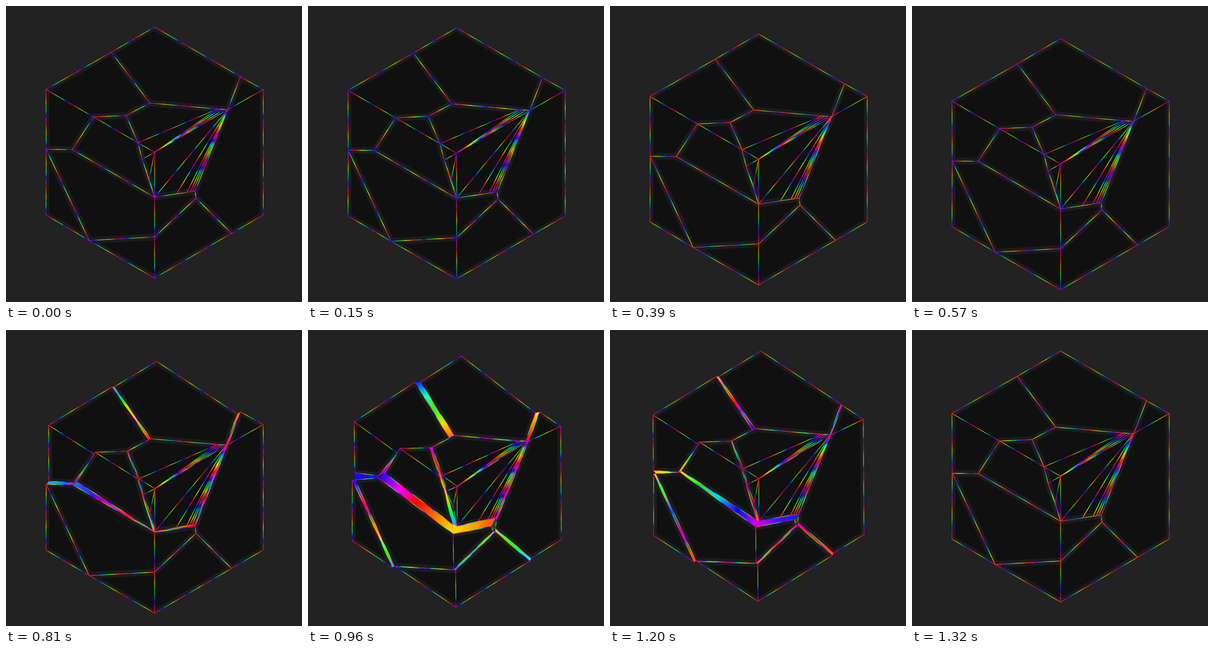
An HTML page with a canvas for the animation above (1.35 s loop, 500 by 500 pixels).

```html
<!DOCTYPE html>
<html lang="en">
<head>
<meta charset="utf-8">
<title>Shattering cube</title>
<style>
html, body { margin: 0; width: 100%; height: 100%; overflow: hidden; background: #222; }
canvas { display: block; width: 500px; height: 500px; }
</style>
</head>
<body>
<canvas id="stage" width="500" height="500"></canvas>
<script>
const ctx = document.getElementById('stage').getContext('2d');
const LOOP = 1350, STEP = 30;

// Hues of a seven-colour rainbow, spread evenly over one turn.
const HUES = [0, 28, 54, 120, 192, 245, 298, 360];

// Corners of the closed cube and its cracks.
const rest = {
  a: [251, 35.5], b: [396, 119.5], c: [434.5, 141], d: [434.5, 353], e: [381, 384],
  f: [251, 459.5], g: [140.5, 396], h: [67.5, 353], i: [68, 242], j: [67.5, 141],
  k: [178, 78], l: [243, 164], m: [357, 174], n: [374.5, 175], o: [203, 185],
  p: [148, 187.5], q: [112, 242.5], r: [251, 247], s: [251, 323], t: [319.5, 312.5],
  u: [321, 324.5], v: [251, 390], w: [223, 231], x: [230, 259], y: [242, 292]
};

// Each shard, back to front: outline, creases, and where its corners go when opened.
const shards = {
  G: { outline: 'ihg', creases: [], late: true, open: { i: [80, 246], h: [80, 343], g: [144, 390] } },
  H: { outline: 'gvuef', creases: ['vf'], late: true, open: {
    g: [154, 388], v: [248, 402], u: [313, 338], e: [370, 380], f: [249, 460] } },
  F: { outline: 'iqstuvg', creases: ['sv'], late: true, open: {
    i: [88, 246], q: [125, 241], s: [241, 346], t: [303, 331], u: [306, 338], v: [242, 401], g: [150, 386] } },
  C: { outline: 'bcdeutn', creases: ['cn'], late: true, open: {
    b: [388, 138], c: [421, 164], d: [423, 340], e: [374, 372], u: [313, 328], t: [318, 312], n: [371, 183] } },
  A: { outline: 'kjiqpol', creases: ['jp'], open: {
    k: [181, 82], j: [78, 149], i: [79, 235], q: [119, 240], p: [151, 202], o: [207, 193], l: [239, 177] } },
  B: { outline: 'abnmlk', creases: [], open: {
    a: [259, 38], b: [384, 134], n: [368, 181], m: [355, 181], l: [247, 172], k: [190, 82] } },
  D: { outline: 'powxsq', creases: ['pw'], open: {
    p: [155, 194], o: [206, 193], w: [222, 241], x: [230, 265], s: [244, 322], q: [130, 236] } },
  E: { outline: 'lmntsyxwo', creases: ['wm', 'rm', 'rn', 'rw', 'rx', 'ry', 'rs', 'ns'], open: {
    l: [247, 172], m: [355, 182], n: [370, 182], t: [317, 311], s: [252, 325],
    y: [245, 293], x: [234, 266], w: [227, 240], o: [210, 192], r: [252, 258] } }
};

// Glowing faces between two shards: ends, first phase and phase span in degrees.
const seams = [
  ['A', 'B', 'kl', 345, -195], ['A', 'D', 'pq', 60, -40], ['A', 'F', 'iq', -10, 20],
  ['D', 'F', 'qs', 5, 195], ['E', 'F', 'st', 200, -60], ['D', 'E', 'os', 50, 265],
  ['B', 'C', 'bn', 206, -110], ['E', 'C', 'nt', 100, -50], ['C', 'H', 'ue', 225, 75],
  ['F', 'H', 'vu', 320, -90], ['F', 'H', 'gv', 280, 80], ['F', 'G', 'ig', -10, 320]
];

const lerp = (a, b, u) => a + (b - a) * u;
const mix = (p, q, u) => [lerp(p[0], q[0], u), lerp(p[1], q[1], u)];
const smooth = (from, to, t) => {
  const u = Math.min(1, Math.max(0, (t - from) / (to - from)));
  return u * u * (3 - 2 * u);
};
const bob = t => 21.3 * Math.pow((1 - Math.cos(2 * Math.PI * t / LOOP)) / 2, 1.25);

function opening(t, late) {
  const out = late ? smooth(815, 1080, t) : smooth(690, 960, t);
  return out * (1 - smooth(1085, 1310, t));
}

function pose(shard, t) {
  const amount = opening(t, shard.late), dy = bob(t), peakDy = bob(1080), points = {};
  for (const key in shard.open) {
    const [x, y] = shard.open[key];
    const [px, py] = mix(rest[key], [x, y - peakDy], amount);
    points[key] = [px, py + dy];
  }
  return points;
}

function color(phase) {
  const turn = ((phase % 360) + 360) % 360 / 360 * 7;
  const band = Math.floor(turn);
  return `hsl(${lerp(HUES[band], HUES[band + 1], turn - band)}, 100%, 50%)`;
}

function rainbow(p, q, phase, span) {
  const gradient = ctx.createLinearGradient(p[0], p[1], q[0], q[1]);
  const stops = Math.max(2, Math.ceil(Math.abs(span) / 360 * 7));
  for (let i = 0; i <= stops; i++) {
    gradient.addColorStop(i / stops, color(phase + span * i / stops));
  }
  return gradient;
}

function trace(points) {
  ctx.beginPath();
  points.forEach(p => ctx.lineTo(p[0], p[1]));
  ctx.closePath();
}

function drawLine(p, q, phase) {
  const cycles = Math.max(1, Math.round(Math.hypot(q[0] - p[0], q[1] - p[1]) / 55));
  ctx.strokeStyle = rainbow(p, q, phase, 360 * cycles);
  ctx.beginPath();
  ctx.moveTo(p[0], p[1]);
  ctx.lineTo(q[0], q[1]);
  ctx.stroke();
}

function drawSeams(poses, t) {
  const shift = -64.4 * (t - 1080) / STEP;
  for (const [first, second, [from, to], phase, span] of seams) {
    const P = poses[first], Q = poses[second];
    trace([P[from], P[to], Q[to], Q[from]]);
    ctx.fillStyle = rainbow(mix(P[from], Q[from], .5), mix(P[to], Q[to], .5), phase + shift, span);
    ctx.fill();
  }
  const { C, D, E, F } = poses;
  trace([D.s, E.s, F.s]);
  ctx.fillStyle = color(200 + shift);
  ctx.fill();
  trace([E.t, C.t, C.u, F.u, F.t]);
  ctx.fillStyle = '#1d4a30';
  ctx.fill();
}

function drawFace(points) {
  ctx.save();
  trace(points);
  ctx.fillStyle = '#101010';
  ctx.fill();
  ctx.clip();
  ctx.lineWidth = 11;
  ctx.strokeStyle = 'rgba(255, 245, 220, .05)';
  ctx.stroke();
  ctx.restore();
}

function drawEdges(shard, points, phase) {
  const keys = [...shard.outline];
  keys.forEach((key, i) => drawLine(points[key], points[keys[(i + 1) % keys.length]], phase));
  shard.creases.forEach(([from, to]) => drawLine(points[from], points[to], phase));
}

function drawFan({ m, n, r, s, t }, phase) {
  [.3, .65].forEach(u => drawLine(r, mix(m, n, u), phase));
  [.54, .8, .88, .94].forEach(u => drawLine(mix(s, t, u), n, phase));
}

function draw(t) {
  const phase = 300 - 80 * t / STEP + 3.5 * bob(t);
  const poses = {};
  for (const name in shards) poses[name] = pose(shards[name], t);

  ctx.fillStyle = '#222';
  ctx.fillRect(0, 0, 500, 500);
  drawSeams(poses, t);
  ctx.lineWidth = 1.2;
  for (const name in shards) {
    drawFace([...shards[name].outline].map(key => poses[name][key]));
    ctx.globalAlpha = .8;
    drawEdges(shards[name], poses[name], phase);
    ctx.globalAlpha = 1;
  }
  drawFan(poses.E, phase);
}

function tick() {
  draw(Math.floor(performance.now() % LOOP / STEP) * STEP);
  requestAnimationFrame(tick);
}
tick();
</script>
</body>
</html>
```
